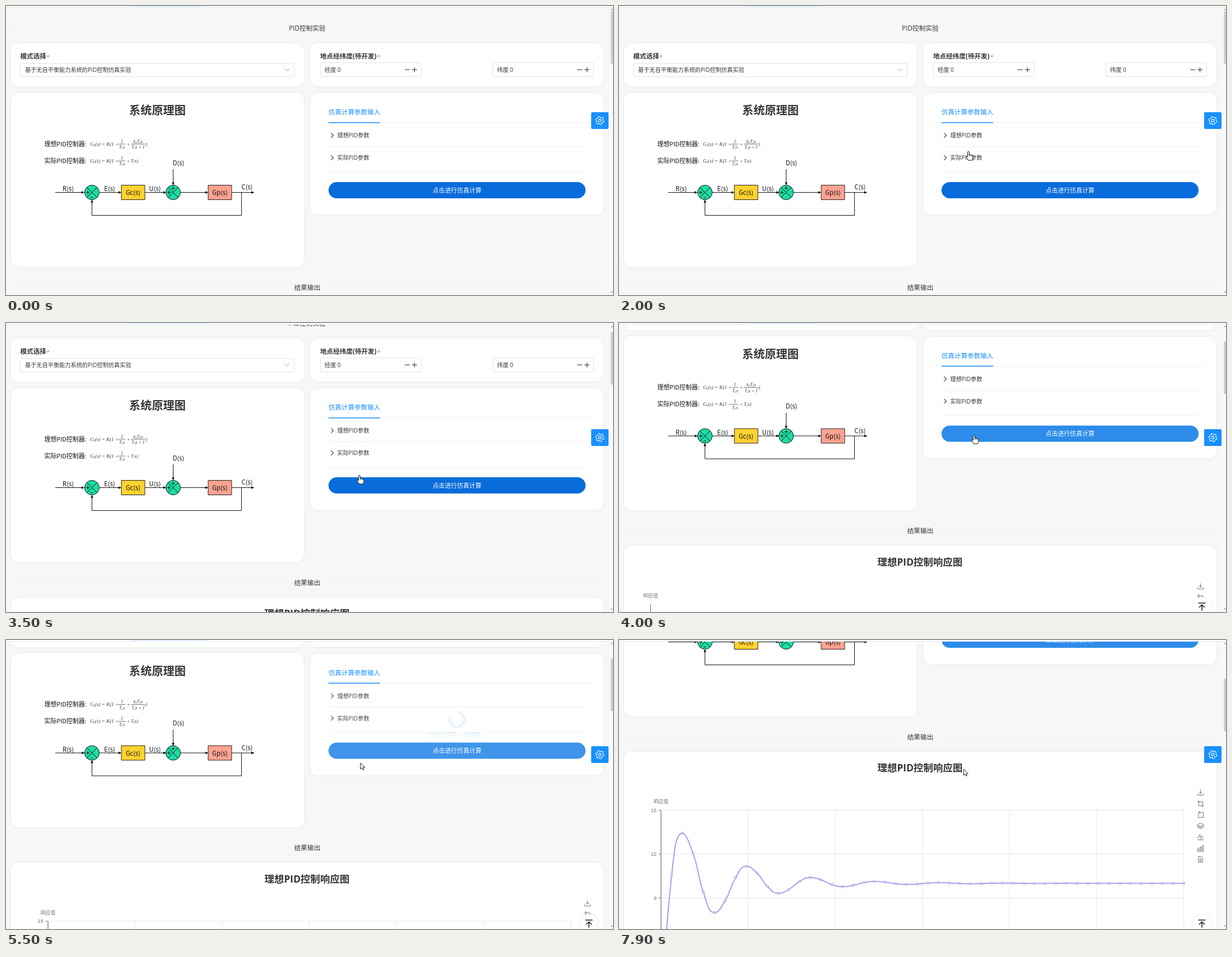
An HTML page with a canvas that plays this animation: 1084x517 px, repeating every 8 s.

```html
<!DOCTYPE html>
<html lang="zh-CN">
<head>
<meta charset="utf-8">
<title>PID控制实验</title>
<style>
html, body { margin: 0; width: 100%; height: 100%; overflow: hidden; background: #f6f8f8; }
canvas { display: block; width: 1084px; height: 517px; }
</style>
</head>
<body>
<canvas id="stage" width="1084" height="517"></canvas>
<script>
const ctx = document.getElementById('stage').getContext('2d');
const LOOP = 8000, STEP = 100, OPEN = 165;
const UI = '"Open Sans", "Noto Sans CJK SC", "Noto Sans CJK", sans-serif';
const CJK = '"Noto Sans CJK SC", "Noto Sans CJK", "Noto Sans", sans-serif';
const INK = '#333639', BLUE = '#1890ff', RULE = '#eeeff2';

const clamp = (v, a = 0, b = 1) => Math.min(b, Math.max(a, v));
const ramp = (t, start, length) => clamp((t - start) / length);
const ease = p => p < .4 ? 2.9 * p * p * (1 + p * .25) : 1 - Math.pow(1 - p, 2.35);

// keys: [time, value, value...], linear between neighbours
function track(keys, t) {
  if (t <= keys[0][0]) return keys[0].slice(1);
  for (let i = 1; i < keys.length; i++) {
    const a = keys[i - 1], b = keys[i];
    if (t <= b[0]) {
      const p = ramp(t, a[0], b[0] - a[0]);
      return a.slice(1).map((v, k) => v + (b[k + 1] - v) * p);
    }
  }
  return keys[keys.length - 1].slice(1);
}

function text(s, x, y, size, { color = INK, align = 'left', weight = 400, font = UI, style = '' } = {}) {
  ctx.font = `${style} ${weight} ${size}px ${font}`;
  ctx.fillStyle = color;
  ctx.textAlign = align;
  ctx.textBaseline = 'alphabetic';
  ctx.fillText(s, x, y + size * .37);
  return ctx.measureText(s).width;
}

function line(points, color = '#111', width = 1) {
  ctx.beginPath();
  points.forEach(([x, y], i) => i ? ctx.lineTo(x, y) : ctx.moveTo(x, y));
  ctx.strokeStyle = color;
  ctx.lineWidth = width;
  ctx.stroke();
}

function box(x, y, w, h, r, fill, stroke, width = 1) {
  ctx.beginPath();
  ctx.roundRect(x, y, w, h, r);
  if (fill) { ctx.fillStyle = fill; ctx.fill(); }
  if (stroke) { ctx.strokeStyle = stroke; ctx.lineWidth = width; ctx.stroke(); }
}

function disc(x, y, r, fill, stroke, width = 1) {
  ctx.beginPath();
  ctx.arc(x, y, r, 0, 7);
  if (fill) { ctx.fillStyle = fill; ctx.fill(); }
  if (stroke) { ctx.strokeStyle = stroke; ctx.lineWidth = width; ctx.stroke(); }
}

function icon(path, x, y, color, width = 1, fill) {
  ctx.save();
  ctx.translate(x, y);
  const p = new Path2D(path);
  if (fill) { ctx.fillStyle = fill; ctx.fill(p); }
  ctx.strokeStyle = color;
  ctx.lineWidth = width;
  ctx.lineJoin = 'round';
  ctx.stroke(p);
  ctx.restore();
}

function card(x, y, w, h) {
  ctx.save();
  ctx.shadowColor = 'rgba(60,90,100,.10)';
  ctx.shadowBlur = 4;
  box(x, y, w, h, 13, '#fff');
  ctx.restore();
}

function chevron(x, y, turn, color = INK) {
  ctx.save();
  ctx.translate(x, y);
  ctx.rotate(turn * Math.PI / 2);
  line([[-2, -4.2], [2.2, 0], [-2, 4.2]], color, 1.1);
  ctx.restore();
}

function heading(s, y) {
  const half = s.length * 4 + 16;
  line([[9, y], [538 - half, y]], '#edf1f1');
  line([[538 + half, y], [1066, y]], '#edf1f1');
  text(s, 538, y, 11.7, { align: 'center' });
}

function numberField(x, label) {
  box(x + .5, 101.5, 180, 25, 2, '#fff', '#dfe2e6');
  text(label, x + 8, 114, 10.2);
  line([[x + 151, 114], [x + 160, 114]], INK, 1.1);
  line([[x + 164, 114], [x + 173, 114]], INK, 1.1);
  line([[x + 168.5, 109.5], [x + 168.5, 118.5]], INK, 1.1);
}

function drawForm() {
  heading('PID控制实验', 39.5);
  card(9, 66.5, 523, 78);
  text('模式选择', 25.5, 90, 11.6, { weight: 700 });
  text('*', 72, 91, 11, { color: '#f5754a' });
  box(25.5, 102.5, 489, 24, 2, '#fff', '#dfe2e6');
  text('基于无自平衡能力系统的PID控制仿真实验', 34, 114.5, 10.2);
  chevron(502, 114, 1, '#bfc4cb');
  card(543.5, 66.5, 523, 77);
  text('地点经纬度(待开发)', 561, 90, 11.6, { weight: 700 });
  text('*', 663, 91, 11, { color: '#f5754a' });
  numberField(561, '经度 0');
  numberField(869, '纬度 0');
}

function math(s, x, y, align = 'left', size = 9) {
  const style = 'italic', font = '"Liberation Serif", "Noto Serif", serif', small = size * .65;
  // a digit or letter after "_" is set as a subscript
  const parts = s.split(/(_.)/);
  const width = p => {
    ctx.font = `${style} ${p[0] === '_' ? small : size}px ${font}`;
    return ctx.measureText(p.replace('_', '')).width;
  };
  const total = parts.reduce((sum, p) => sum + width(p), 0);
  if (align === 'center') x -= total / 2;
  for (const p of parts) {
    const sub = p[0] === '_';
    text(p.replace('_', ''), x, y + (sub ? 2 : 0), sub ? small : size, { style, font });
    x += width(p);
  }
}

function fraction(top, bottom, x, y, half) {
  math(top, x, y - 5, 'center', 8);
  math(bottom, x, y + 5.5, 'center', 8);
  line([[x - half, y], [x + half, y]], INK, .7);
}

function arrow(points) {
  line(points);
  const [[x0, y0], [x, y]] = points.slice(-2);
  ctx.save();
  ctx.translate(x, y);
  ctx.rotate(Math.atan2(y - y0, x - x0));
  ctx.beginPath();
  ctx.moveTo(0, 0); ctx.lineTo(-5, -2.3); ctx.lineTo(-5, 2.3);
  ctx.fillStyle = '#000';
  ctx.fill();
  ctx.restore();
}

function plus(x, y) {
  line([[x - 3, y], [x + 3, y]]);
  line([[x, y - 3], [x, y + 3]]);
}

function drawDiagram() {
  card(9, 155.5, 523, 311);
  text('系统原理图', 270.5, 187, 20.2, { weight: 700, align: 'center' });
  [['理想PID控制器:', 246.5], ['实际PID控制器:', 276.5]].forEach(([s, y]) => {
    text(s, 68.5, y, 10.9, { font: CJK, color: '#111' });
    math('G_c(s) = K(1 +', 150, y);
    fraction('1', 'T_1s', 207, y + .5, 6);
  });
  math('+', 215.5, 246.5);
  fraction('k_2T_2s', 'T_2s + 1', 236, 247, 13);
  math(')', 249, 246.5);
  math('+ T_2s)', 215.5, 276.5, 'left', 8.2);

  const y = 333.5;
  arrow([[88, y], [140, y]]);
  arrow([[166, y], [206, y]]);
  arrow([[248, y], [286, y]]);
  arrow([[311, y], [361, y]]);
  arrow([[403, y], [443, y]]);
  arrow([[298.5, 292], [298.5, 320.5]]);
  arrow([[420.5, y], [420.5, 374.5], [153.5, 374.5], [153.5, 346.5]]);
  for (const x of [153.5, 298.5]) {
    disc(x, y, 13, '#1ddca4', '#111');
    line([[x - 9, y - 9], [x + 9, y + 9]]);
    line([[x - 9, y + 9], [x + 9, y - 9]]);
    plus(x - 7.5, y);
  }
  line([[151, 342.5], [155, 342.5]]);
  plus(298.5, 326);
  box(206, 320.5, 42, 26, 0, '#ffd22f', '#222');
  box(361, 320.5, 42, 26, 0, '#ffa290', '#222');
  [['R(s)', 111, 327], ['E(s)', 185, 327], ['U(s)', 266, 327], ['C(s)', 430.5, 324],
   ['D(s)', 308, 280.5], ['Gc(s)', 227, 334], ['Gp(s)', 382, 334]]
    .forEach(([s, x, cy]) => text(s, x, cy, 11.2, { align: 'center', font: CJK, color: '#111' }));
}

const FIELDS = [['K', '5'], ['T1', '0.5'], ['T2', '0.6'], ['Ki', '10'], ['T', '50']];

function drawFields(top, panel) {
  if (panel.height <= 0) return;
  ctx.save();
  ctx.beginPath();
  ctx.rect(570, top - 1, 480, Math.max(0, panel.height - 6));
  ctx.clip();
  ctx.globalAlpha *= panel.alpha;
  FIELDS.forEach(([name, value], i) => {
    const y = top + i * 33.2;
    box(576.5, y + .5, 458, 24.5, 2, '#fff', '#dfe2e6');
    const w = text(name + '：', 585, y + 13, 10.2, { color: '#444' });
    text(value, 588 + w, y + 13, 10.2, { color: '#444' });
  });
  ctx.restore();
}

function drawParams(t, first, second, dim) {
  const d1 = first.height, d = d1 + second.height;
  card(543.5, 156, 523, 217.5 + d);
  line([[564, 208.5], [1048, 208.5]], RULE);
  text('仿真计算参数输入', 576, 190, 11.55, { color: BLUE });
  box(576, 208, 92, 1.6, 0, BLUE);

  ctx.save();
  ctx.globalAlpha = 1 - .5 * dim;
  chevron(582.5, 231.5, first.turn);
  text('理想PID参数', 591.5, 231.5, 10.2);
  drawFields(251, first);
  line([[576, 251.5 + d1], [1035, 251.5 + d1]], RULE);
  chevron(582.5, 271.5 + d1, second.turn);
  text('实际PID参数', 591.5, 271.5 + d1, 10.2);
  drawFields(291 + d1, second);
  line([[576, 297.5 + d], [1035, 297.5 + d]], RULE);
  box(576, 315 + d, 459, 29, 14.5, t >= 3700 ? '#2d8ce9' : '#086cdb');
  ctx.restore();
  text('点击进行仿真计算', 805.5, 329.5 + d, 10.9, { color: '#fff', align: 'center' });

  if (dim > 0) {
    ctx.save();
    ctx.globalAlpha = dim;
    const turn = (t - 4600) / 1400 * 2 * Math.PI;
    ctx.beginPath();
    ctx.arc(805, 273.5, 13.5, turn + 1.0, turn + 5.5);
    ctx.strokeStyle = '#2d8cf0';
    ctx.lineWidth = 2.4;
    ctx.lineCap = 'round';
    ctx.stroke();
    text('正在计算中，请稍等...', 805.5, 301, 10.2, { color: '#2d8cf0', align: 'center' });
    ctx.restore();
  }
}

// Damped step response settling at 10
const response = Array.from({ length: 50 }, (_, i) => {
  const swing = 5.065 * Math.pow(.8355, i) * Math.cos((i - 2) * Math.PI / 3 - .248);
  const value = i === 0 ? 0 : i === 1 ? 10.56 : 10 + swing;
  return [75 + i * 19.05, 634.5 + (15 - value) * 26.17];
});

// Bezier handles kept between neighbouring points so peaks stay flat
function handles(points, i) {
  const p = points[i], a = points[i - 1], b = points[i + 1];
  if (!a || !b) return [p, p];
  const la = Math.hypot(p[0] - a[0], p[1] - a[1]), lb = Math.hypot(b[0] - p[0], b[1] - p[1]);
  const within = (v, u, w) => clamp(v, Math.min(u, w), Math.max(u, w));
  const k = .5 * lb / (la + lb);
  let out = p.map((v, n) => within(v + (b[n] - a[n]) * k, v, b[n]));
  const back = p.map((v, n) => within(v - (out[n] - v) * la / lb, v, a[n]));
  out = p.map((v, n) => v + (v - back[n]) * lb / la);
  return [back, out];
}

const TOOLS = [
  'M0-5V2M-3-1L0 2L3-1M-5 2V5H5V2',
  'M-3-6V4H6M-6-3H4V6',
  'M-4-2V5H5V-4H-3M-1-6L-4-4L-1-2',
  'M0-5L6-2L0 1L-6-2ZM-6 0L0 3L6 0M-6 2L0 5L6 2',
  'M-6 1H-3L-1-5L1 3L3-1H6M-6 5H6',
  'M-5 1V4H-3V1ZM-1-2V4H1V-2ZM3-5V4H5V-5ZM-6 6H6',
  'M-4-5H2L4-3V5H-4ZM-2-1H2M-2 1H2M-2 3H2'
];

function drawChart(ready) {
  card(9, 530, 1058, 720);
  text('理想PID控制响应图', 537.5, 559, 17.5, { weight: 700, align: 'center' });
  const left = ready ? 75 : 56.5, top = 634.5, muted = '#6e7079';
  text('响应值', left, 619, 8.8, { align: 'center', color: muted });
  TOOLS.forEach((p, i) => icon(p, 1038.5, 602.5 + i * 20, '#666', .9));
  if (!ready) {
    line([[left, top], [left, 1150]], muted);
    return;
  }
  for (let i = 0; i <= 5; i++) {
    const y = top + i * 78.5;
    line([[left, y], [1008.6, y]], '#e3e7f0');
    line([[left - 4, y], [left, y]], muted);
    text(String(15 - 3 * i), 67, y - .5, 9.5, { align: 'right', color: muted, font: '"Liberation Sans", sans-serif' });
  }
  for (let i = 1; i <= 6; i++) line([[left + i * 155.6, top], [left + i * 155.6, 1027]], '#e3e7f0');
  line([[left, top], [left, 1027]], muted, 1.2);

  const color = '#9f95e9';
  ctx.beginPath();
  ctx.moveTo(...response[0]);
  for (let i = 1; i < response.length; i++) {
    ctx.bezierCurveTo(...handles(response, i - 1)[1], ...handles(response, i)[0], ...response[i]);
  }
  ctx.strokeStyle = color;
  ctx.lineWidth = 1.8;
  ctx.stroke();
  response.forEach(([x, y]) => disc(x, y, 1.8, '#fff', color, 1.2));
}

function drawChrome(scroll, shift) {
  ctx.fillStyle = '#fff';
  ctx.fillRect(0, 0, 1084, 2);
  ctx.fillStyle = '#e4e9ee';
  ctx.fillRect(0, 2, 1084, 1);
  box(225, -4, 132, 7, 3, '#e8f2fc');

  ctx.fillStyle = '#fafafa';
  ctx.fillRect(1079, 3, 5, 514);
  const scale = 499 / (2733 + shift);
  ctx.fillStyle = '#cdcdcd';
  ctx.fillRect(1080, 9 + scroll * scale, 4, 515 * scale);
  icon('M-1.5 1L0-1L1.5 1Z', 1082, 6, '#999', .5, '#999');
  icon('M-1.5-1L0 1L1.5-1Z', 1082, 512, '#999', .5, '#999');

  box(1045, 190, 31, 30, 2, BLUE);
  ctx.save();
  ctx.translate(1060.5, 205);
  ctx.beginPath();
  for (let i = 0; i < 24; i++) {
    const r = i % 4 < 2 ? 7.3 : 5.8, a = (i + .5) * Math.PI / 12;
    ctx.lineTo(r * Math.cos(a), r * Math.sin(a));
  }
  ctx.closePath();
  ctx.strokeStyle = '#fff';
  ctx.lineWidth = 1.1;
  ctx.lineJoin = 'round';
  ctx.stroke();
  disc(0, 0, 2.4, null, '#fff', 1.1);
  ctx.restore();

  if (scroll > 100) {
    ctx.save();
    ctx.shadowColor = 'rgba(0,0,0,.09)';
    ctx.shadowBlur = 6;
    disc(1041, 507, 16, '#fff');
    ctx.restore();
    icon('M-6.5-6H6.5M0 7.5V-2.5M-5 2L0-3L5 2', 1041, 507, '#222', 1.6);
  }
}

const POINTER = [
  [100, 780, 4], [300, 690, 130], [500, 632, 224], [600, 629, 229], [1700, 629, 229], [2000, 624, 260],
  [2100, 624, 260], [2300, 624, 274], [3000, 624, 274], [3300, 631, 272], [3500, 631, 272],
  [3900, 634, 200], [4200, 634, 200], [4300, 633, 220], [6100, 633, 220], [6400, 586.5, 261],
  [7700, 586.5, 261], [7900, 615.5, 231]
];

function drawPointer(t) {
  if (t < 100) return;
  const [x, y] = track(POINTER, t);
  if (t >= 500 && t < 4300) {
    icon('M-1.4 9V1Q0-.8 1.4 1V6Q3 5 4 6.5Q5.5 5.7 6.3 7.2Q8 6.7 8 8.5V11.5Q8 14 6.5 16H-.5Q-1.5 13.5-4 10.5Q-4.5 8-1.4 10Z',
      x, y, '#111', 1, '#fff');
    icon('M1.4 6V9M4 6.5V9M6.3 7.2V9', x, y, '#111', .8);
  } else {
    icon('M0 0V11L2.6 8.7L4.4 12.4L6.1 11.6L4.4 8H8Z', x, y, '#222', 1, '#fff');
  }
}

function panelState(t, opens, closes) {
  const rise = ramp(t, opens, 280), fall = ramp(t, closes, 300);
  const p = fall > 0 ? 1 - ease(fall) : ease(rise);
  return {
    height: OPEN * p,
    alpha: fall > 0 ? 1 - fall : clamp((rise - .26) / .74),
    turn: fall > 0 ? 1 - fall : clamp(rise * 1.7)
  };
}

const SCROLL = [[3400, 0], [3500, 39], [3600, 66], [3700, 112], [3800, 131.5], [6900, 131.5], [7000, 330]];

function draw(t) {
  const first = panelState(t, 632, 1420), second = panelState(t, 2460, 3020);
  const shift = Math.max(0, first.height + second.height - 93);
  const [scroll] = track(SCROLL, t);
  const dim = Math.min(ramp(t, 4200, 300), 1 - ramp(t, 5250, 300));

  ctx.fillStyle = '#f6f8f8';
  ctx.fillRect(0, 0, 1084, 517);
  ctx.save();
  ctx.translate(0, -scroll);
  drawForm();
  drawDiagram();
  drawParams(t, first, second, dim);
  ctx.translate(0, shift);
  heading('结果输出', 503.5);
  drawChart(t >= 5300);
  ctx.restore();
  drawChrome(scroll, shift);
  drawPointer(t);
}

function tick(now) {
  draw(Math.floor(now % LOOP / STEP) * STEP);
  requestAnimationFrame(tick);
}
requestAnimationFrame(tick);
</script>
</body>
</html>
```
